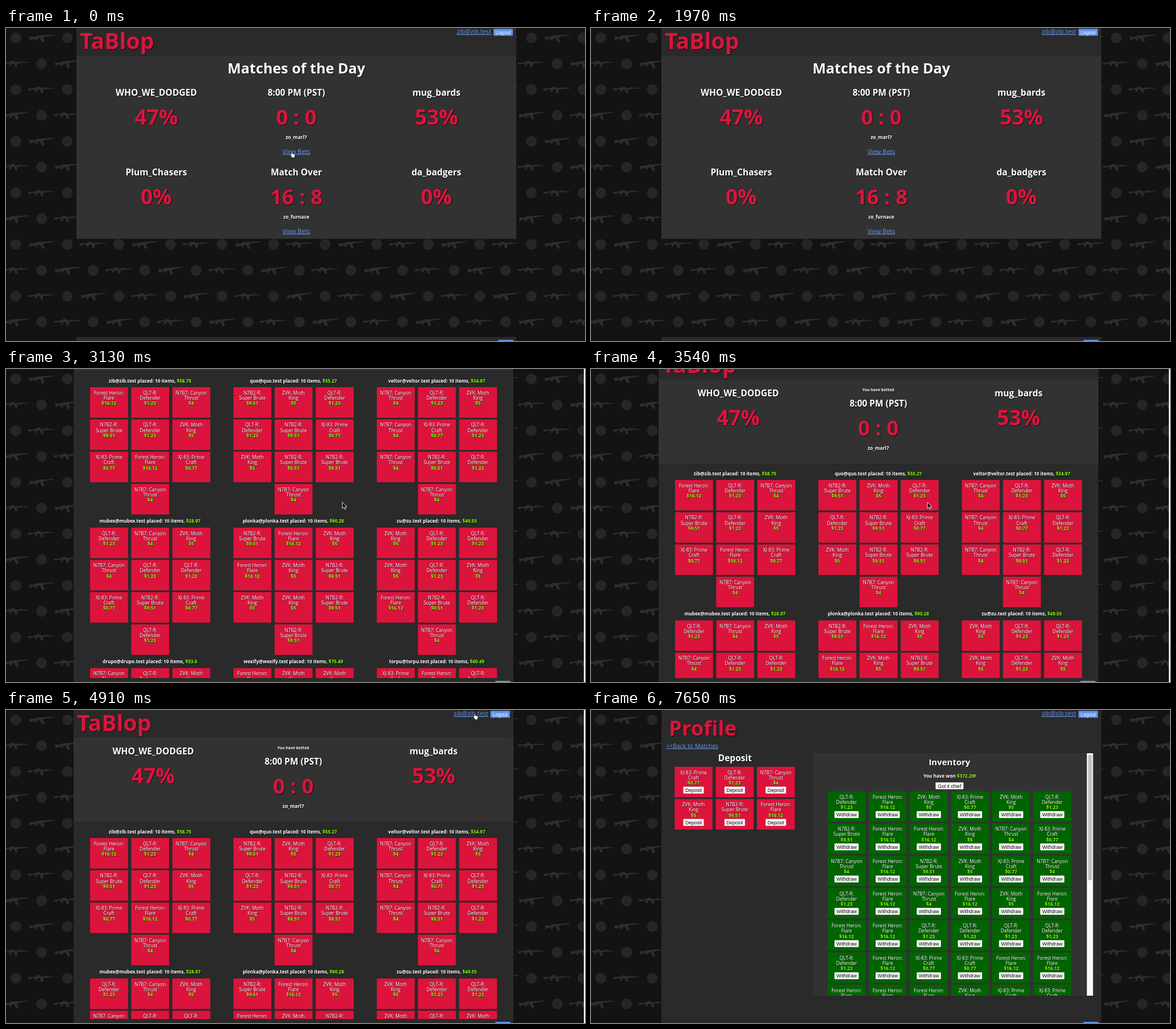
These frames come from a looping animation (1019 by 550 pixels, 7750 ms). An HTML page:

```html
<!DOCTYPE html>
<html lang="en">
<head>
<meta charset="utf-8">
<title>Match bets</title>
<style>
  html, body { margin: 0; width: 100%; height: 100%; overflow: hidden; background: #131313; }
  svg { display: block; width: 100%; height: 100%; }
  text { font-family: "Open Sans", "Noto Sans", sans-serif; text-anchor: middle; fill: #fff; }
  .bold { font-weight: 700; text-shadow: 1px 1px 1px #111; }
  .item { font-weight: 500; text-shadow: .7px .7px .7px #222; }
  .red { fill: #dc143c; }
  .lime { fill: #7fff00; font-weight: 700; }
  .link { fill: #6495ed; text-decoration: underline; }
  .ui { font-family: "Liberation Sans", sans-serif; }
  .black { fill: #000; }
  .start { text-anchor: start; }
</style>
</head>
<body>
<svg id="stage" viewBox="0 0 1019 550"></svg>
<script>
const LOOP = 7750;
const DARK = '#2a2a2a', LIGHT = '#323232', RED = '#dc143c', GREEN = '#006400', BLUE = '#6495ed';
const USER = 'zib@zib.test';
const TEAMS = ['WHO_WE_DODGED', 'mug_bards'];

const ITEMS = {
  D: ['Forest Heron:', 'Flare', '16.12'],
  U: ['QLT-R:', 'Defender', '1.23'],
  S: ['N7B7: Canyon', 'Thrust', '4'],
  H: ['N7B2-R:', 'Super Brute', '9.51'],
  W: ['ZVK: Moth', 'King', '5'],
  A: ['XJ-83: Prime', 'Craft', '0.77']
};

const BETS = [
  [USER, '58.75', 'DUSHUWADAS'],
  ['quo@quo.test', '55.27', 'HWUUHAWHHS'],
  ['veltor@veltor.test', '34.97', 'SUWSAUSHUS'],
  ['mubex@mubex.test', '28.97', 'USWSUUAHAU'],
  ['plonka@plonka.test', '90.28', 'HDWDWHWWHH'],
  ['zu@zu.test', '49.55', 'WUUWUWDHUS'],
  ['drupo@drupo.test', '53.6', 'SUW'],
  ['wexify@wexify.test', '75.49', 'DWW'],
  ['torpu@torpu.test', '60.49', 'ADU']
];

const INVENTORY = 'UDWAWU' + 'HDDWSA' + 'SDHWAS' + 'UDSDWD' + 'DDUUUU' + 'UDAADD' + 'DDDWAA';

const rect = (x, y, w, h, fill, rx = 0) =>
  `<rect x="${x}" y="${y}" width="${w}" height="${h}" fill="${fill}" rx="${rx}"/>`;
const text = (x, y, size, str, cls = 'bold') =>
  `<text x="${x}" y="${y}" font-size="${size}" class="${cls}">${str}</text>`;
const price = amount => `<tspan class="lime">$${amount}</tspan>`;
const button = (cx, y, w, label) =>
  rect(cx - w / 2, y, w, 12, '#fff', 1) + text(cx, y + 9.2, 8.6, label, 'ui black');

function tile(x, y, code, fill, action, actionWidth) {
  const [first, second, cost] = ITEMS[code], cx = x + 33.3;
  return rect(x, y, 66.7, 53.6, fill) +
    text(cx, y + 12.8, 8.4, first, 'item') +
    text(cx, y + 22, 8.4, second, 'item') +
    text(cx, y + 31.3, 8.3, price(cost), 'item') +
    (action ? button(cx, y + 35, actionWidth, action) : '');
}

// A final lone tile in a three-column grid sits in the middle.
const tiles = (codes, columns, x, y, ...look) => [...codes].map((code, i) => {
  const column = columns === 3 && i === 9 ? 1 : i % columns;
  return tile(x + 72.4 * column, y + 56.65 * Math.floor(i / columns), code, ...look);
}).join('');

const account = dx =>
  text(823.5 + dx, 10, 10.9, USER, 'link') +
  rect(858 + dx, 1.5, 34, 12, BLUE, 1) + text(875 + dx, 10.7, 8.7, 'Logout', 'ui');
const logo = x => text(x, 37, 39.2, 'TaBlop', 'bold red start');
const footer = dx => rect(124 + dx, 543, 774, 7, DARK) + rect(866 + dx, 548, 27, 2, BLUE, 1);

const team = (cx, y, name, percent) =>
  text(cx, y, 15.6, name) + text(cx, y + 50.5, 37.3, percent + '%', 'bold red');

const match = (y, teams, percents, status, score, map) =>
  teams.map((name, i) => team([264.5, 757.5][i], y, name, percents[i])).join('') +
  text(511, y, 15.5, status) +
  text(511, y + 50.5, 36.6, score, 'bold red') +
  text(511, y + 76, 8.5, map) +
  text(511, y + 101.5, 10.9, 'View Bets', 'link');

// Each row repeats badge, rifle, badge, carbine, shifted one cell from the row above.
function backdrop() {
  const motifs = ['badge', 'rifle', 'badge', 'carbine'];
  let out = '';
  for (let row = 0; row < 12; row++)
    for (let col = 0; col < 24; col++) {
      const id = motifs[(col - row + 12) % 4];
      out += `<use href="#${id}" x="${17.3 + 45.37 * col}" y="${17.5 + 45.37 * row}"/>`;
    }
  return out;
}

function matchesScene() {
  return rect(124, 0, 774, 48.5, DARK) + rect(124, 48.5, 774, 322, LIGHT) +
    logo(130) + account(0) +
    text(511, 79.5, 25.2, 'Matches of the Day') +
    match(119, TEAMS, [47, 53], '8:00 PM (PST)', '0 : 0', 'zo_marl7') +
    match(259, ['Plum_Chasers', 'da_badgers'], [0, 0], 'Match Over', '16 : 8', 'zo_furnace') +
    footer(0);
}

function betsScene() {
  const groups = BETS.map(([who, total, codes], i) => {
    const dx = 252.3 * (i % 3), y = 217 + 246.8 * Math.floor(i / 3);
    return text(253.5 + dx, y - .5, 8.1, `${who} placed: 10 items, ${price(total)}`) +
      tiles(codes, 3, 148 + dx, y + 8, RED);
  }).join('');
  return rect(119, 0, 774, 550, DARK) +
    `<g clip-path="url(#page)"><g id="scroller">` +
    rect(119, 48.5, 774, 147.5, LIGHT) + logo(125) + account(-5.3) +
    team(259, 78, TEAMS[0], 47) + team(752.5, 78, TEAMS[1], 53) +
    text(505.7, 69, 6.9, 'You have betted') +
    text(505.7, 96, 15.5, '8:00 PM (PST)') +
    text(505.7, 146.5, 36.6, '0 : 0', 'bold red') +
    text(505.7, 172, 8.5, 'zo_marl7') +
    groups + '</g></g>' + footer(-5) + rect(1017, 0, 2, 550, '#fafafa');
}

function profileScene() {
  return rect(124, 0, 774, 550, DARK) + account(0) +
    text(137, 44.5, 36.5, 'Profile', 'bold red start') +
    text(132, 66.5, 10.5, '&lt;&lt;Back to Matches', 'link start') +
    text(253.3, 90, 15.5, 'Deposit') +
    tiles('AUSWHD', 3, 147.2, 99.8, RED, 'Deposit', 36) +
    rect(390, 76, 493.5, 426, LIGHT) +
    text(631, 97, 15, 'Inventory') +
    text(631, 119, 8.2, `You have won ${price('372.29')}!`) +
    button(631, 127.3, 49, 'Got it chief') +
    `<g clip-path="url(#list)">${tiles(INVENTORY, 6, 416.5, 142.8, GREEN, 'Withdraw', 42.5)}</g>` +
    rect(872.7, 76, 10.8, 426, '#fafafa') + rect(875, 78.5, 6.5, 221, '#c1c1c1', 3.2) +
    footer(0);
}

const stage = document.getElementById('stage');
stage.innerHTML = `
  <defs>
    <clipPath id="page"><rect width="1019" height="543"/></clipPath>
    <clipPath id="list"><rect x="390" y="76" width="483" height="426"/></clipPath>
    <circle id="badge" r="9.5" fill="#262626"/>
    <path id="rifle" d="M-22-2H-12L-9-4L6-5L22-6V-4.5L8-2.5L2-1L5 6L1 8L-3 0L-7 1L-9 5L-12 4L-11 1L-21 4Z"/>
    <path id="carbine" d="M-24-2H-15L-13-3H-9V-5H-2V-3H6L7-4H12V-3H22V-1.5H12L2 0L3 6H-1L-3 0H-7L-9 4H-12L-11 0H-15L-23 2Z"/>
  </defs>
  <g fill="#2e2e2e">${backdrop()}</g>
  <g class="scene">${matchesScene()}</g>
  <g class="scene">${betsScene()}</g>
  <g class="scene">${profileScene()}</g>
  <path id="arrow" d="M0 0V11L2.6 8.6L4.4 12.6L6.2 11.8L4.5 8H8Z" stroke="#fff" stroke-width=".9"/>
  <path id="hand" d="M2 6V1.5Q3-.2 4 1.5V4.5L8 5.5Q9 6 8.8 8L7.8 12H3.5L.5 7.5Q.8 6 2 6Z" fill="#fff" stroke="#000" stroke-width=".8"/>`;

const scenes = [...stage.querySelectorAll('.scene')];
const scroller = document.getElementById('scroller');
const cursors = ['arrow', 'hand'].map(id => document.getElementById(id));

// Each step: start time in ms, then its values, held until the next step.
const SCENE = [[0, 0], [2270, 1], [5800, 2]];
const SCROLL = [[0, 0], [3130, 193], [3280, 205], [3540, 30], [3780, 21], [3990, 17], [4230, 0]];
const CURSOR = [
  [0, 'hand', 500, 216], [1970, ''], [2120, 'arrow', 499, 210], [2510, 'arrow', 509, 219],
  [2710, 'arrow', 592, 234], [4440, 'arrow', 853, 65], [4670, 'arrow', 822, 8],
  [4910, 'hand', 822, 5], [5650, 'arrow', 876, 223], [5800, 'arrow', 885, 258],
  [5920, 'arrow', 888, 266], [6120, 'arrow', 908, 320], [6240, 'arrow', 940, 420],
  [6360, 'arrow', 962, 476], [6600, 'arrow', 962, 500], [6720, 'arrow', 962, 530], [6840, '']
];
const stepAt = (steps, t) => steps.filter(([start]) => start <= t).pop().slice(1);
const show = (element, visible) => element.style.display = visible ? '' : 'none';

function render(t) {
  const [scene] = stepAt(SCENE, t), [scroll] = stepAt(SCROLL, t);
  const [shape, x, y] = stepAt(CURSOR, t);
  scenes.forEach((element, i) => show(element, i === scene));
  scroller.setAttribute('transform', `translate(0 ${-scroll})`);
  cursors.forEach(cursor => {
    show(cursor, cursor.id === shape);
    if (cursor.id === shape) cursor.setAttribute('transform', `translate(${x} ${y})`);
  });
}

const began = performance.now();
function frame() {
  render((performance.now() - began) % LOOP);
  requestAnimationFrame(frame);
}
frame();
</script>
</body>
</html>
```
